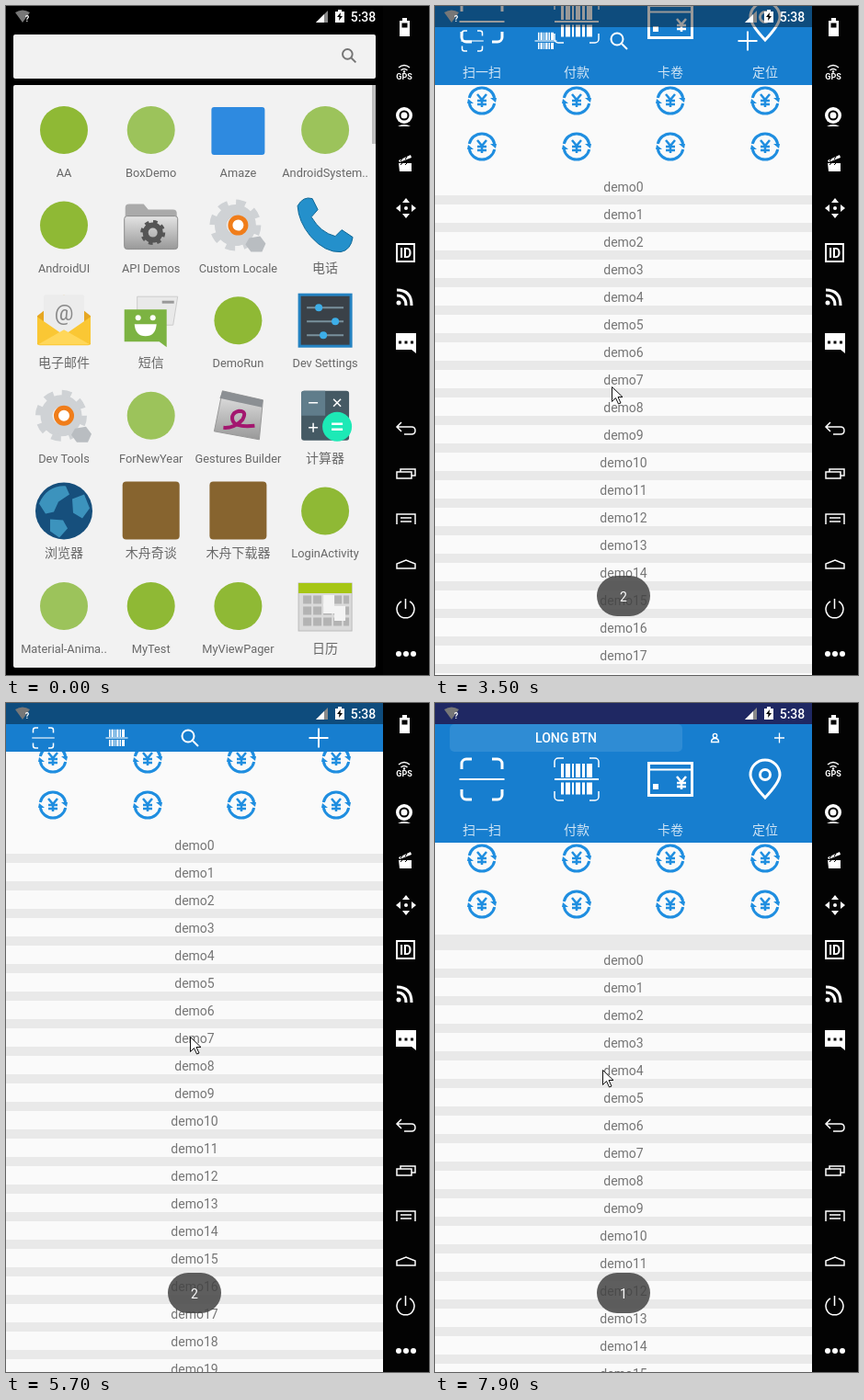
Animation, 460 px wide and 728 px high, one loop 8000 ms. Source, as an HTML page:

```html
<!DOCTYPE html>
<html lang="zh">
<head>
<meta charset="utf-8">
<title>Collapsing header demo</title>
<style>
  html, body { margin: 0; width: 100%; height: 100%; overflow: hidden; background: #000; }
  svg { display: block; width: 460px; height: 728px; font: 14px Roboto, "Noto Sans CJK SC", "Noto Sans CJK", sans-serif; }
  text { text-anchor: middle; }
  .line { fill: none; stroke: #fff; stroke-width: 1.5; }
  .bold { stroke-width: 3; }
  .white { fill: #fff; }
  .latin { font-size: 12.8px; }
</style>
</head>
<body>
<svg viewBox="0 0 460 728">
  <defs>
    <clipPath id="window"><rect id="windowRect"/></clipPath>
    <linearGradient id="steel" x2="0" y2="1"><stop stop-color="#e4e4e4"/><stop offset="1" stop-color="#999"/></linearGradient>

    <g id="scan" class="line">
      <path class="bold" d="M-22-11v-6a5 5 0 0 1 5-5h6M11-22h6a5 5 0 0 1 5 5v6M22 11v6a5 5 0 0 1-5 5h-6M-11 22h-6a5 5 0 0 1-5-5v-6"/>
      <path d="M-24.500 0h49" style="stroke-width:2.200"/>
    </g>
    <g id="bars" class="line" stroke-dasharray="3 2 5 2 2 2 5 2 3 2 6">
      <path d="M-17-9.500h34" style="stroke-width:15"/><path d="M-17 10h34" style="stroke-width:13"/>
      <path d="M-24 0h48" stroke-dasharray="none" style="stroke-width:2"/>
    </g>
    <path id="corners" class="line" d="M-24-13v-6a4 4 0 0 1 4-4h6M14-23h6a4 4 0 0 1 4 4v6M24 13v6a4 4 0 0 1-4 4h-6M-14 23h-6a4 4 0 0 1-4-4v-6"/>
    <path id="yuan" d="M-5-7l5 6 5-6M0-1v8M-5 0h10M-5 4h10"/>
    <g id="halfRing"><path d="M-13.700-3A14 14 0 0 1 13.700-3" fill="none" stroke="#1f8ee0" stroke-width="3"/><path d="M9-3h7l-1 5z" fill="#1f8ee0"/></g>
    <g id="exchange">
      <use href="#halfRing"/><use href="#halfRing" transform="rotate(180)"/>
      <use href="#yuan" fill="none" stroke="#1f8ee0" stroke-width="2.500"/>
    </g>

    <circle id="green" r="26" fill="#8fb935"/>
    <circle id="lime" r="26" fill="#9cc35b"/>
    <rect id="blue" x="-29" y="-25" width="58" height="52" rx="3" fill="#2e8ae0"/>
    <rect id="bronze" x="-31" y="-32" width="62" height="63" rx="4" fill="#87642f"/>
    <g id="folder">
      <path d="M-28 25v-44q0-4 4-4h16l5 6h27q4 0 4 4v38z" fill="#aaa"/>
      <rect x="-29" y="-10" width="58" height="36" rx="3" fill="url(#steel)" stroke="#8c8c8c"/>
      <circle cx="2" cy="8" r="8" fill="none" stroke="#555" stroke-width="6"/>
      <circle cx="2" cy="8" r="11.500" fill="none" stroke="#555" stroke-width="4" stroke-dasharray="4.500 4.530"/>
    </g>
    <g id="gear">
      <g fill="none" stroke="#cfd2d5"><circle cx="-3" r="16" stroke-width="13"/><circle cx="-3" r="24" stroke-width="8" stroke-dasharray="10 8.850"/></g>
      <path d="M12 14l12-2 6 8-4 9-12 0-6-8z" fill="#b9bdc1"/>
      <circle r="8.500" fill="#fff" stroke="#f07d1a" stroke-width="5"/>
    </g>
    <path id="phone" d="M-30-21Q-24-32-14-29L-8-17-15-9Q-5 8 11 12L18 5 30 13Q28 27 17 29 0 30-16 12-29-4-30-21z" fill="#2490cb" stroke="#116896"/>
    <g id="mail">
      <path d="M-29-5L0-28 29-5v31h-58z" fill="#e6a723"/><rect x="-22" y="-28" width="44" height="44" rx="2" fill="#ececec"/>
      <text y="0" style="font-size:23px" fill="#888">@</text>
      <path d="M-29-4L0 16 29-4v28q0 3-3 3h-52q-3 0-3-3z" fill="#fac734"/><path d="M-28 26L0 10 28 26z" fill="#ffd75a"/>
    </g>
    <g id="sms">
      <path d="M-15-26h44l-5 31h-39z" fill="#e9e9e9" stroke="#ccc"/><path d="M12-20h13" stroke="#999" stroke-width="3"/>
      <path d="M-29-12h46v41l-8-6h-38z" fill="#7cb342"/>
      <path d="M-18 4h24q-1 13-12 13T-18 4z" fill="#fff"/><circle cx="-14" cy="-3" r="3" fill="#fff"/><circle cx="2" cy="-3" r="3" fill="#fff"/>
    </g>
    <g id="sliders">
      <rect x="-28" y="-28" width="56" height="56" fill="#3a4148" stroke="#2583c2" stroke-width="3"/>
      <path d="M-20-14h40M-20 1h40M-20 16h40" stroke="#78909c" stroke-width="2"/>
      <g fill="#3daee8"><circle cx="-7" cy="-14" r="4"/><circle cx="11" cy="1" r="4"/><circle cx="-2" cy="16" r="4"/></g>
    </g>
    <g id="pad">
      <path d="M-17-27l44 10-4 43-49-9z" fill="url(#steel)" stroke="#999"/><path d="M-17-27l44 10-1 8-46-10z" fill="#8b8f93"/>
      <path d="M-16 13Q-4 14 5 4 10-5 1-5-8-3-6 5T18 11" fill="none" stroke="#a3176f" stroke-width="4"/>
    </g>
    <g id="calc">
      <rect x="-26" y="-27" width="52" height="54" rx="3" fill="#455a64"/><path d="M-26-24q0-3 3-3H0V0h-26z" fill="#607d8b"/>
      <path d="M-18-14h10M-18 13h10M-13 8v10M9-18l8 8M17-18l-8 8" class="line"/>
      <circle cx="13" cy="12" r="16" fill="#1de9b6"/><path d="M7 9h12M7 15h12" class="line" style="stroke-width:2.500"/>
    </g>
    <g id="globe">
      <circle r="31" fill="#164f7c"/>
      <path d="M-27-8Q-18-28 2-27L6-18-6-10-11 1-20 3zM9-13l13-5 6 15-8 11-10-6zM-15 9l14 1 5 9-9 10-10-7z" fill="#3c93bd"/>
    </g>
    <g id="calendar">
      <rect x="-29" y="-25" width="58" height="52" fill="#dadada" stroke="#bbb"/><rect x="-29" y="-25" width="58" height="11" fill="#a6c614"/>
      <path d="M-24-7h50M-24 5h50M-24 17h50" stroke="#b3b3b3" stroke-width="9" stroke-dasharray="9 2"/>
      <path d="M-2-12h12v12h12v16h-12v-8h-12z" fill="#f4f4f4"/>
    </g>
    <g id="magnifier" fill="none"><circle cx="-2" cy="-2" r="6.500"/><path d="M3 3l6 6"/></g>
  </defs>

  <rect width="460" height="728"/>
  <g id="launcher">
    <rect x="8" y="31" width="394" height="48" rx="2" fill="#f2f2f2"/>
    <use href="#magnifier" transform="translate(373 54) scale(.82)" stroke="#757575" stroke-width="2.400"/>
    <rect x="8" y="86" width="394" height="634" rx="2" fill="#f2f2f2"/>
    <rect x="398" y="86" width="4" height="64" fill="#bdbdbd"/>
    <g id="apps" fill="#686868"></g>
  </g>

  <g id="app" clip-path="url(#window)">
    <rect width="410" height="728" fill="#fafafa"/>
    <g id="content">
      <g id="page">
        <rect y="252" width="410" height="1100" fill="#e9e9e9"/>
        <g id="rows" fill="#757575"></g>
        <g id="exchanges"></g>
      </g>
      <g id="header">
        <rect width="410" height="152" fill="#177ecf"/>
        <g id="headerItems">
          <use href="#scan" x="51" y="83"/>
          <use href="#corners" x="154" y="83"/><use href="#bars" x="154" y="83"/>
          <g class="line bold"><path d="M232.500 65.500h47v35h-47z"/><path d="M232 72.500h48" style="stroke-width:2"/></g>
          <rect x="237" y="88" width="6" height="6" class="white"/>
          <use href="#yuan" x="268" y="87" fill="none" stroke="#fff" stroke-width="2.500"/>
          <path class="line bold" d="M359 103Q343 86 343 78a16 16 0 0 1 32 0Q375 86 359 103z"/>
          <circle class="line bold" cx="359" cy="78" r="5.500"/>
          <g id="headerLabels" fill="#d1e5f5"></g>
        </g>
      </g>
      <g id="openBar">
        <rect x="16" y="23" width="253" height="30" rx="5" fill="#2f8cd4"/>
        <text x="142.500" y="43" class="white" font-weight="500">LONG BTN</text>
        <g class="line" style="stroke-width:1.300"><circle cx="304.500" cy="35.500" r="2.200"/><path d="M300.500 42.500q0-4 4-4t4 4zM369 38h11M374.500 32.500v11"/></g>
      </g>
      <g id="closedBar">
        <use href="#scan" transform="translate(40.500 38) scale(.5)"/>
        <use href="#bars" transform="translate(120.500 38) scale(.5 .55)"/>
        <use href="#magnifier" x="200" y="38" stroke="#fff" stroke-width="2"/>
        <path class="line" style="stroke-width:2" d="M329.500 38h21M340 27.500v21"/>
      </g>
    </g>
    <rect id="statusBar" width="410" height="23"/>
    <g id="toast">
      <rect x="176" y="620" width="58" height="44" rx="22" fill="#444" opacity=".85"/>
      <text id="toastText" x="205" y="648" class="white"></text>
    </g>
  </g>

  <g class="white">
    <path d="M10 7q8-5 16 0l-8 11z" fill="#777"/><text x="23" y="17" style="font-size:9px" font-weight="700">?</text>
    <path d="M337 18l13-13v13z" fill="#8a8a8a"/><path d="M337 18l9-9v9z"/>
    <path d="M358 6h3V4h4v2h3v12h-10z"/><path d="M364 7l-4 5h2.500l-.5 4 4-5h-2.500z" fill="#000"/>
    <text x="388.500" y="17" font-weight="500">5:38</text>
  </g>

  <g id="sidebar" class="white">
    <rect x="410" width="50" height="728" fill="#030303"/>
    <path d="M428 16h3v-3h5v3h3v17h-11zM428 180h13v-9h-14zM427 168l13-6 1 3-13 5z"/>
    <path d="M430.500 18.500h6v5h-6z" fill="#000"/>
    <path d="M429 169l2-3M434 167l2-3M429 173l2-2M434 173l2-2" stroke="#000"/>
    <path class="line" d="M427 67q6-5 12 0M429.500 70q3.500-3 7 0"/><circle cx="433" cy="71.500" r="1.200"/>
    <text x="433" y="80" style="font-size:9px" font-weight="700">GPS</text>
    <circle cx="433" cy="119" r="9"/><circle cx="433" cy="119" r="4.500" fill="none" stroke="#000" stroke-width="2"/><path d="M426 131q7-4 14 0z"/>
    <path d="M435 209l4 5h-8zM435 231l4-5h-8zM424 220l5-4v8zM446 220l-5-4v8z"/><circle cx="435" cy="220" r="2"/>
    <rect class="line" style="stroke-width:2" x="425" y="259" width="19" height="19"/><text x="434.500" y="274" font-weight="700">ID</text>
    <circle cx="427" cy="323" r="2.500"/><path class="line bold" d="M425 315q10 0 10 11M425 309q16 0 16 17"/>
    <path d="M424 356h22v22l-5-4h-17z"/><path d="M427 366h3M433.500 366h3M440 366h3" stroke="#000" stroke-width="3"/>
    <g class="line">
      <path d="M430 453l-5 5 5 5M425 458h16q4 0 4 4t-4 4h-8M425 507h16v7h-16zM429 507v-3h16v7h-4M425 564v-11h20v11M429 557h12M429 561h12M425 612v-5l10-4 10 4v5zM430 648a9.500 9.500 0 1 0 9 0M434.500 645v11"/>
    </g>
    <circle cx="427" cy="705" r="3"/><circle cx="435" cy="705" r="3"/><circle cx="443" cy="705" r="3"/>
  </g>
  <path id="cursor" d="M.5.5v16l4-4 3 6.500 2.500-1-3-6.500h5z" fill="#fff" stroke="#111"/>
</svg>
<script>
const $ = id => document.getElementById(id);
const columns = [51, 154, 256, 359];
const LOOP = 8000, STEP = 100, COLLAPSE = 99;

const apps = [
  ['AA', 'green'], ['BoxDemo', 'lime'], ['Amaze', 'blue'], ['AndroidSystem..', 'lime'],
  ['AndroidUI', 'green'], ['API Demos', 'folder'], ['Custom Locale', 'gear'], ['电话', 'phone'],
  ['电子邮件', 'mail'], ['短信', 'sms'], ['DemoRun', 'green'], ['Dev Settings', 'sliders'],
  ['Dev Tools', 'gear'], ['ForNewYear', 'lime'], ['Gestures Builder', 'pad'], ['计算器', 'calc'],
  ['浏览器', 'globe'], ['木舟奇谈', 'bronze'], ['木舟下载器', 'bronze'], ['LoginActivity', 'green'],
  ['Material-Anima..', 'lime'], ['MyTest', 'green'], ['MyViewPager', 'green'], ['日历', 'calendar'],
];
$('apps').innerHTML = apps.map(([name, icon], i) => {
  const x = 63 + i % 4 * 94.7, y = 135 + Math.floor(i / 4) * 103.6;
  const style = /^[ -~]+$/.test(name) ? 'class="latin"' : '';
  return `<use href="#${icon}" x="${x}" y="${y}"/><text x="${x}" y="${y + 51}" ${style}>${name}</text>`;
}).join('');

$('rows').innerHTML = Array.from({ length: 32 }, (_, i) =>
  `<rect y="${252 + i * 30}" width="410" height="20" fill="#fafafa"/><text x="205" y="${268 + i * 30}">demo${i}</text>`).join('');
$('exchanges').innerHTML = '<rect y="152" width="410" height="100" fill="#fafafa"/>' +
  [169, 219].map(y => columns.map(x => `<use href="#exchange" x="${x}" y="${y}"/>`).join('')).join('');
$('headerLabels').innerHTML = ['扫一扫', '付款', '卡卷', '定位'].map((label, i) =>
  `<text x="${columns[i]}" y="142.500">${label}</text>`).join('');

// Keys are [time, value, ...]; values between keys are linear.
const pointerKeys = [
  [200, 448, 48], [600, 149, 136], [1600, 149, 136], [2400, 180, 299], [3200, 190, 478],
  [3500, 192, 414], [4600, 185, 219], [5000, 184, 205], [5100, 184, 205], [5700, 200, 363],
  [5800, 201, 372], [6100, 213, 140], [6600, 215, 240], [6900, 212, 174], [7600, 190, 350], [7900, 182, 399],
];
const scrollKeys = [[3200, 0], [3500, 66], [4600, 243], [5000, 262], [5100, 262], [5700, 108], [5800, 99], [6100, 99], [6500, 0]];
const pullKeys = [[7700, 0], [7900, 17]];
const revealKeys = [[1100, 157, 135, 0, 0], [1400, 0, 1, 410, 720], [1500, 0, 1, 410, 720], [1600, 0, 0, 410, 728]];

function sample(keys, t) {
  const next = keys.findIndex(key => key[0] > t);
  if (next === 0) return keys[0].slice(1);
  if (next < 0) return keys[keys.length - 1].slice(1);
  const a = keys[next - 1], b = keys[next], k = (t - a[0]) / (b[0] - a[0]);
  return a.slice(1).map((v, i) => v + (b[i + 1] - v) * k);
}
const clamp = v => Math.max(0, Math.min(1, v));
const move = (id, x, y) => $(id).setAttribute('transform', `translate(${Math.round(x)} ${Math.round(y)})`);
const show = (id, visible) => { $(id).style.display = visible ? '' : 'none'; };

function draw(t) {
  const [scroll] = sample(scrollKeys, t), [pull] = sample(pullKeys, t);
  const offset = Math.min(scroll, COLLAPSE), progress = offset / COLLAPSE;
  const collapsed = progress > .5;

  show('app', t >= 1200);
  show('launcher', t < 1600);
  show('content', t >= 1600);
  const reveal = sample(revealKeys, t);
  ['x', 'y', 'width', 'height'].forEach((name, i) => $('windowRect').setAttribute(name, reveal[i]));

  move('page', 0, -scroll);
  move('rows', 0, pull);
  move('header', 0, -offset);
  $('headerItems').style.opacity = 1 - clamp((progress - .68) / .3);
  show('openBar', !collapsed);
  show('closedBar', collapsed);
  $('statusBar').setAttribute('fill', collapsed ? 'rgba(0,0,0,.4)' : '#1f2863');

  $('toast').style.opacity = clamp((t - 1600) / 300);
  $('toastText').textContent = collapsed ? 2 : 1;

  show('cursor', t >= 200);
  move('cursor', ...sample(pointerKeys, t));
}

const start = performance.now();
function tick() {
  const t = (performance.now() - start) % LOOP;
  draw(Math.floor(t / STEP) * STEP);
  requestAnimationFrame(tick);
}
tick();
</script>
</body>
</html>
```
